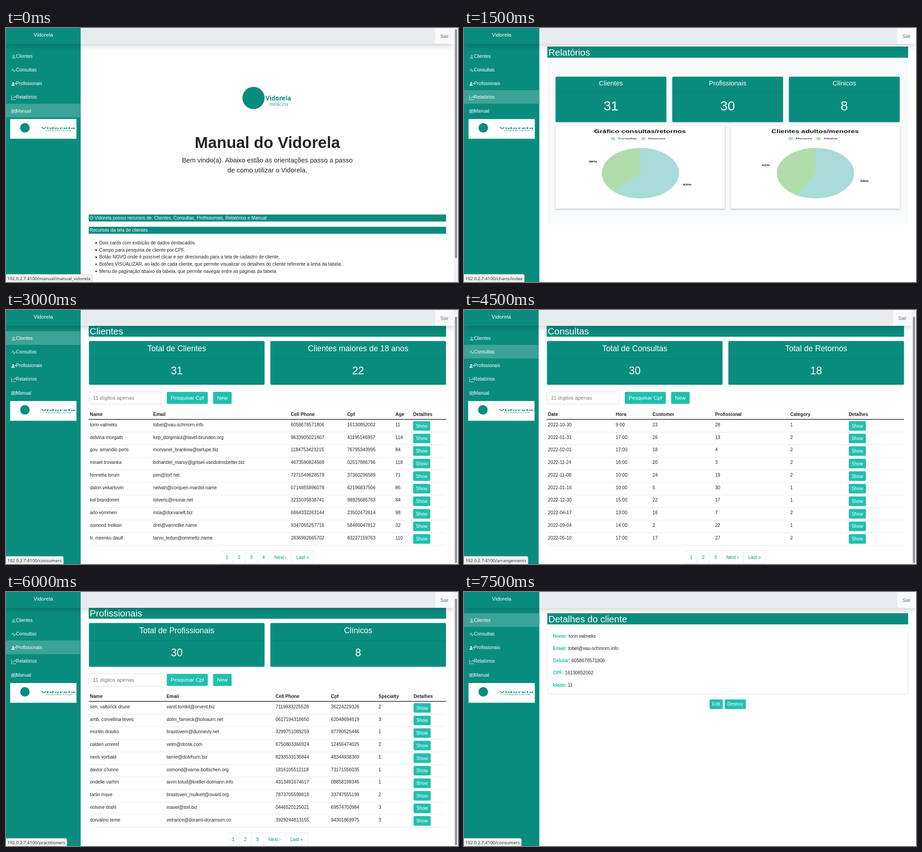
Animation of 998x561 px, one loop 8 s. Source, as an HTML page with a canvas:

```html
<!DOCTYPE html>
<html lang="pt">
<head>
<meta charset="utf-8">
<title>Vidorela</title>
<style>
html, body { margin: 0; width: 100%; height: 100%; overflow: hidden; background: #fff; }
canvas { display: block; }
</style>
</head>
<body>
<canvas id="stage" width="998" height="561"></canvas>
<script>
const W = 998, H = 561;
const K = W / 1366; // page pixels to stage pixels
const LOOP = 8000, HOLD = 1500;
const SANS = '"Liberation Sans", Arial, sans-serif';
const NOTO = '"Noto Sans", sans-serif';
const TEAL = '#098c7e', MINT = '#21bfae', INK = '#212529', LINE = '#dee2e6';
const BLUE = '#a9dbda', GREEN = '#b0dcaa';
const BRAND = 'Vidorela';
const HOST = '192.0.2.7:4100/';
const ctx = document.getElementById('stage').getContext('2d');

function rect(x, y, w, h, color) {
  ctx.fillStyle = color;
  ctx.fillRect(x, y, w, h);
}

function box(x, y, w, h, r, fill, stroke) {
  ctx.beginPath();
  ctx.roundRect(x, y, w, h, r);
  if (fill) { ctx.fillStyle = fill; ctx.fill(); }
  if (stroke) { ctx.strokeStyle = stroke; ctx.lineWidth = 0.8; ctx.stroke(); }
}

function disc(x, y, r, color) {
  ctx.beginPath();
  ctx.arc(x, y, r, 0, Math.PI * 2);
  ctx.fillStyle = color;
  ctx.fill();
}

// size is in page pixels; returns the drawn width
function text(str, x, y, size = 14, color = INK, { align = 'left', weight = 400, family = SANS } = {}) {
  ctx.font = `${weight} ${size * K}px ${family}`;
  ctx.textAlign = align;
  ctx.fillStyle = color;
  ctx.fillText(str, x, y);
  return ctx.measureText(str).width;
}

const centered = (str, x, y, size, color, weight) =>
  text(str, x, y, size, color, { align: 'center', weight });

function withShadow(dy, blur, alpha, draw) {
  ctx.save();
  ctx.shadowColor = `rgba(0,0,0,${alpha})`;
  ctx.shadowOffsetY = dy * K;
  ctx.shadowBlur = blur * K;
  draw();
  ctx.restore();
}

function button(label, x, y, w, h, size) {
  box(x, y, w, h, 2.8, MINT);
  centered(label, x + w / 2, y + h / 2 + size * K * 0.35, size, '#fff');
}

// Icons live on a 16 x 16 grid
const icons = [
  { line: 'M8 2.5a2.6 2.6 0 1 1 0 5.2a2.6 2.6 0 1 1 0-5.2zM2.5 13.5c0-4.6 11-4.6 11 0z' },
  { line: 'M0 8.5h3L5.5 3l4.5 11 2.5-5.5H16' },
  { fill: 'M6 2a3 3 0 1 1 0 6a3 3 0 1 1 0-6zM0 14c0-6.5 12-6.5 12 0z', line: 'M13.5 4v5M11 6.5h5' },
  { line: 'M.6 0v15.4H16M3 11l4-4.5 3 2.5 4.5-5.5M10.5 3.5h4v4' },
  { line: 'M1.5 2.5h13a1 1 0 0 1 1 1v9a1 1 0 0 1-1 1h-13a1 1 0 0 1-1-1v-9a1 1 0 0 1 1-1zM3 6h10M3 8.3h10M3 10.6h6' }
];

function icon({ line, fill }, x, y) {
  ctx.save();
  ctx.translate(x, y);
  ctx.scale(0.64, 0.64);
  ctx.strokeStyle = ctx.fillStyle = '#fff';
  ctx.lineWidth = 1.2;
  if (fill) ctx.fill(new Path2D(fill));
  if (line) ctx.stroke(new Path2D(line));
  ctx.restore();
}

// Brand lettering around the centre line of its emblem
function lettering(x, y, sx, sy) {
  ctx.save();
  ctx.translate(x, y);
  ctx.scale(sx, sy);
  text(BRAND, 51, 5, 18.7, TEAL, { weight: 700, family: NOTO });
  text('medicina', 59, 17.5, 13.6, TEAL, { weight: 300, family: 'Inter, sans-serif' });
  ctx.restore();
}

const menu = ['Clientes', 'Consultas', 'Profissionais', 'Relatórios', 'Manual'];

function sidebar(side, active) {
  rect(0, 0, side, H, TEAL);
  rect(0, 46.8 + active * 30.15, side, 30.15, '#3ba397');
  menu.forEach((label, i) => {
    const y = 65.9 + i * 30.15;
    icon(icons[i], 11.8, y - 7.8);
    text(label, 22, y, 14, '#fff');
  });
  const x = side / 2 - 73.2;
  rect(x, 201, 146.4, 43.6, '#fff');
  disc(x + 32.5, 220.5, 10.5, TEAL);
  lettering(x, 220.5, 1.34, 0.43);
}

function header(side, right) {
  withShadow(8, 16, 0.15, () => rect(0, 0, right, 35, '#e9ecef'));
  rect(0, 0, side, 35, TEAL);
  centered(BRAND, side / 2, 19, 16, '#fff');
  rect(right - 41.5, 0, 41.5, 35, '#f8f9fa');
  text('Sair', right - 30, 21.5, 14, '#707070');
}

function scrollbar(top, bottom) {
  rect(989, 0, 9, H, '#f0f0f0');
  box(991.4, top, 4.4, bottom - top, 2.2, '#8e8e8e');
}

function status(path) {
  ctx.font = `${13.33 * K}px ${NOTO}`;
  const w = ctx.measureText(HOST + path).width + 6.8;
  box(-2, 544, w + 2, 20, [0, 3, 0, 0], '#f1f2f2', '#bfc2c2');
  text(HOST + path, 3, 556.6, 13.33, '#2e3436', { family: NOTO });
}

function banner(label, x, y, w) {
  rect(x, y, w, 24.6, TEAL);
  text(label, x + 2.2, y + 19.8, 28, '#fff');
}

function card(x, y, w, h, split, title, size, num, numSize) {
  withShadow(2, 4, 0.15, () => box(x, y, w, h, 2.5, TEAL));
  rect(x, split, w, 0.8, 'rgba(0,0,0,.12)');
  const mid = x + w / 2;
  centered(title, mid, (y + split) / 2 + size * K * 0.27 - 1.5, size, '#fff');
  centered(num, mid, (split + y + h) / 2 + numSize * K * 0.25, numSize, '#fff');
}

function manual() {
  disc(546.5, 154.5, 24.5, TEAL);
  lettering(522, 154.5, 1, 1);
  centered('Manual do ' + BRAND, 577.2, 265.2, 48, INK, 700);
  centered('Bem vindo(a). Abaixo estão as orientações passo a passo', 577, 296.6, 20);
  centered(`de como utilizar o ${BRAND}.`, 577, 318.5, 20);
  const bars = [`O ${BRAND} possui recursos de: Clientes, Consultas, Profissionais, Relatórios e Manual`,
    'Recursos da tela de clientes'];
  bars.forEach((label, i) => {
    const y = 412 + i * 27;
    rect(182.6, y, 789, 15.4, TEAL);
    text(label, 184.8, y + 11.2, 14, '#fff');
  });
  [
    'Dois cards com exibição de dados destacados.',
    'Campo para pesquisa de cliente por CPF.',
    'Botão NOVO onde é possível clicar e ser direcionado para a tela de cadastro de cliente.',
    'Botões VISUALIZAR, ao lado de cada cliente, que permite visualizar os detalhes do cliente referente a linha da tabela.',
    'Menu de paginação abaixo da tabela, que permite navegar entre as páginas da tabela.'
  ].forEach((label, i) => {
    const y = 477.9 + i * 15.7;
    disc(199, y - 3.2, 1.8, INK);
    text(label, 205.8, y);
  });
}

// The chart is laid out round, then widened to fill its panel
function chart(x, title, share, keys, keyX, labels) {
  const wide = 1.53, black = '#111';
  withShadow(2, 5, 0.25, () => box(x, 216.3, 373.6, 182.7, 1.5, '#fff'));
  ctx.save();
  ctx.translate(x + 187.2, 320.6);
  ctx.scale(wide, 1);
  centered(title, -0.5, -88.5, 10.36 / K, black, 700);
  keys.forEach((key, i) => {
    rect(keyX[i] / wide, -79.4, 6, 6.2, i ? GREEN : BLUE);
    text(key, (keyX[i] + 15.7) / wide, -74.4, 6.1 / K, black);
  });
  disc(0, 0, 55.7, GREEN);
  ctx.beginPath();
  ctx.moveTo(0, 0);
  ctx.arc(0, 0, 55.7, -Math.PI / 2, (share * 2 - 0.5) * Math.PI);
  ctx.fillStyle = BLUE;
  ctx.fill();
  for (const [label, lx, ly] of labels)
    centered(label, lx / wide, ly, 6 / K, black, 700);
  ctx.restore();
}

function reports() {
  rect(184, 41, 796.6, 393, '#f8f9fb');
  banner('Relatórios', 184, 41, 796.6);
  [['Clientes', 31], ['Profissionais', 30], ['Clínicos', 8]].forEach(([title, num], i) =>
    card(202.2 + i * 257.6, 107.4, 244.6, 100.3, 142.2, title, 20, num, 40));
  chart(202.2, 'Gráfico consultas/retornos', 30 / 48, ['Consultas', 'Retornos'], [-64.8, 2],
    [['38%', -105, -23.8], ['63%', 103.5, 27.2]]);
  chart(588.8, 'Clientes adultos/menores', 18 / 31, ['Menores', 'Adultos'], [-59.6, 2.2],
    [['42%', -110, -16], ['58%', 108, 19.3]]);
}

function digits(count, seed) {
  let out = '', s = seed * 7919 + 17;
  while (out.length < count) {
    s = (s * 1103515245 + 12345) % 2147483648;
    out += Math.floor(s / 2147483648 * 10);
  }
  return out;
}

// "name|email|last" lines become full table rows
const people = (lines, seed) => lines.map((line, i) => {
  const [name, email, last] = line.split('|');
  return [name, email, digits(13, seed + i), digits(11, seed + i + 50), last];
});

const clients = people([
  'torin valmeks|tobel@vau-schmorn.info|11',
  'delvina morgath|kep_dorgmaul@tavel-brunden.org|114',
  'gov. amandio perls|morvanel_brankow@tarlupe.biz|84',
  'mirael trovanka|bohandel_marvy@gritsel-vandolmsbetter.biz|118',
  'fennetta lorum|pim@torl.net|71',
  'dalon vekartovin|nelvah@corquen-mardol.name|86',
  'kel brandomm|tolveric@munar.net|84',
  'arlo vommen|mila@dorvanelt.biz|98',
  'osmond trelkan|drel@vannolke.name|32',
  'fr. mirenko daulf|tarvo_ledun@ommeltz.name|110'
], 3);

const staff = people([
  'sen. valtorick drune|varel.tomkit@orvent.biz|2',
  'amb. corvellina teves|dolm_farneck@tolvaurn.net|3',
  'mortiln dravko|brastovern@dunnevly.net|1',
  'calden umrest|velm@drosk.com|2',
  'neris vorbald|tamie@dolvhurn.biz|1',
  "davior o'lunne|osmond@varne-boltschen.org|1",
  'ondelle varhm|arvin.tolud@kreller-dolmann.info|1',
  'tarlin mave|brastoven_mulkert@ovard.org|2',
  'nolvine drahl|mavel@torl.biz|3',
  'dorvalino teme|velrance@dorami-doramsen.co|3'
], 120);

const visits = [
  '2022-10-30 9:00 23 28 1', '2022-01-31 17:00 26 13 2', '2022-02-01 17:00 18 4 2',
  '2022-11-24 16:00 20 3 2', '2022-11-08 10:00 24 19 2', '2022-01-16 10:00 5 30 1',
  '2022-12-30 15:00 22 17 1', '2022-04-17 13:00 16 7 2', '2022-09-04 14:00 2 22 1',
  '2022-05-10 17:00 17 27 2'
].map(line => line.split(' '));

function pager(pages) {
  const labels = [...Array(pages).keys()].map(i => i + 1).concat('Next ›', 'Last »');
  let x = 577 - (pages * 26.8 + 97.4) / 2;
  labels.forEach((label, i) => {
    const w = i < pages ? 26.8 : 48.7;
    rect(x, 531.6, w, 0.8, LINE);
    rect(x, 560, w, 0.8, LINE);
    rect(x + w - 0.4, 531.6, 0.8, 29, LINE);
    centered(label, x + w / 2, 550.1, 14, TEAL);
    x += w;
  });
}

function listing(title, cards, heads, cols, rows, pages) {
  banner(title, 182.6, 34.4, 789);
  cards.forEach(([label, num], i) =>
    card(183.2 + i * 400.6, 68.6, 387.6, 96.4, 106.6, label, 24, num, 32));
  box(183, 180.8, 160, 27, 3, '#fff', '#ced4da');
  text('11 dígitos apenas', 191.8, 198.4, 16, '#757a7f');
  button('Pesquisar Cpf', 355, 180.8, 90.6, 26.8, 16);
  button('New', 457.3, 180.8, 40.9, 26.8, 16);
  heads.forEach((head, i) => text(head, cols[i], 234, 14, INK, { weight: 700 }));
  rect(182.6, 240.8, 789, 1.5, INK);
  rows.forEach((row, i) => {
    const y = 242.2 + i * 27.74;
    row.forEach((cell, j) => text(cell, cols[j], y + 14.7));
    button('Show', cols[5], y + 3.2, 37.8, 21.2, 14);
    rect(182.6, y + 27.2, 789, 0.8, LINE);
  });
  pager(pages);
}

function details() {
  banner('Detalhes do cliente', 184, 46.9, 796.6);
  box(184.4, 77.9, 795.8, 147.5, 3, '#fff', '#dcdcdc');
  const [name, email, phone, cpf, age] = clients[0];
  [['Nome', name], ['Email', email], ['Celular', phone], ['CPF', cpf], ['Idade', age]].forEach(([key, value], i) => {
    const y = 101.1 + i * 27;
    const w = text(key + ': ', 196.4, y, 14, MINT, { weight: 700 });
    text(value, 196.4 + w, y);
  });
  button('Edit', 542.2, 237.3, 29, 21.2, 14);
  button('Destroy', 575.7, 237.3, 46.6, 21.2, 14);
}

const scenes = [
  { active: 4, path: 'manual/manual_vidorela', thumb: [2.5, 508.5], draw: manual },
  { active: 3, path: 'charts/index', draw: reports },
  { active: 0, path: 'consumers', thumb: [15, 559], draw: () => listing('Clientes',
    [['Total de Clientes', 31], ['Clientes maiores de 18 anos', 22]],
    ['Name', 'Email', 'Cell Phone', 'Cpf', 'Age', 'Detalhes'],
    [185.3, 325.1, 628.8, 753.4, 859.8, 898.9], clients, 4) },
  { active: 1, path: 'arrangements', thumb: [15, 559], draw: () => listing('Consultas',
    [['Total de Consultas', 30], ['Total de Retornos', 18]],
    ['Date', 'Hora', 'Customer', 'Profissional', 'Category', 'Detalhes'],
    [185.3, 335.1, 416.3, 554.4, 720.3, 849.6], visits, 3) },
  { active: 2, path: 'practitioners', thumb: [15, 559], draw: () => listing('Profissionais',
    [['Total de Profissionais', 30], ['Clínicos', 8]],
    ['Name', 'Email', 'Cell Phone', 'Cpf', 'Specialty', 'Detalhes'],
    [185.3, 354.5, 595.2, 717.5, 822.5, 899.9], staff, 3) },
  { active: 0, path: 'consumers', draw: details }
];

function render({ active, path, thumb, draw }) {
  const right = thumb ? 989 : W, side = right / 6;
  rect(0, 0, W, H, '#fff');
  draw();
  sidebar(side, active);
  header(side, right);
  if (thumb) scrollbar(...thumb);
  status(path);
}

function tick() {
  const t = performance.now() % LOOP;
  render(scenes[Math.floor(t / HOLD)]);
  requestAnimationFrame(tick);
}
tick();
</script>
</body>
</html>
```
